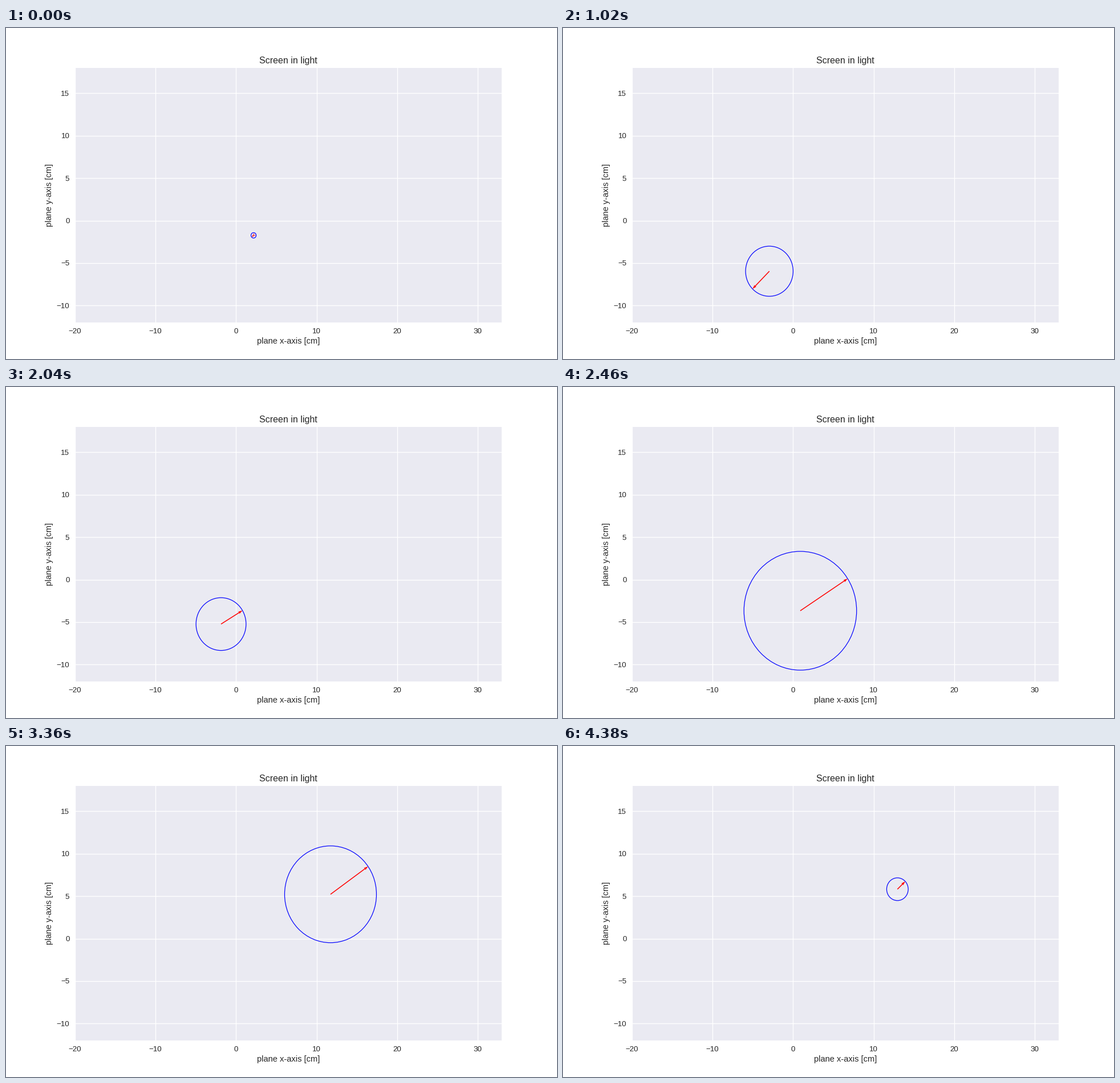
Animation, 966 px wide and 580 px high, one loop 6.16 s. Source, as a matplotlib script:

```python
import numpy as np
import matplotlib.pyplot as plt
from matplotlib.animation import FuncAnimation
from matplotlib.patches import Circle

INTERVAL = 20           # ms per frame
FRAMES = 308            # one loop of 6160 ms
FRAMES_PER_STEP = 3     # the spot moves every 60 ms
STEPS_PER_SECOND = 10   # time scale of the plotted motion

# Key poses: step, position [cm] and velocity [cm/s] as x + yj.
POSES = [
    (0, 2.18 - 1.73j, -0.24 - 0.21j),
    (5, 1.70 - 2.07j, -4.2 - 3.6j),
    (11, -0.86 - 4.16j, -4.89 - 3.74j),
    (22, -3.45 - 6.50j, 0),
    (26, -3.13 - 6.24j, 1.43 + 1.04j),
    (34, -1.86 - 5.23j, 2.66 + 1.60j),
    (46, 4.93 - 0.67j, 10.57 + 8.65j),
    (56, 11.73 + 5.22j, 4.66 + 3.28j),
    (60, 13.10 + 6.10j, 4.0 + 3.0j),
    (64, 18.80 + 10.4j, 0),
    (67, 13.60 + 6.30j, -3.0 - 2.4j),
    (73, 12.96 + 5.82j, 0.97 + 0.92j),
]


def motion(step):
    """Position and velocity on the smooth cubic path through the poses."""
    step = min(step, POSES[-1][0])
    (k0, p0, v0), (k1, p1, v1) = next(
        pair for pair in zip(POSES, POSES[1:]) if step <= pair[1][0])
    span = (k1 - k0) / STEPS_PER_SECOND
    t = (step - k0) / (k1 - k0)
    m0, m1, shift = v0 * span, v1 * span, p1 - p0
    bend = 3 * shift - 2 * m0 - m1
    twist = m0 + m1 - 2 * shift
    position = p0 + t * (m0 + t * (bend + t * twist))
    velocity = (m0 + t * (2 * bend + 3 * t * twist)) / span
    return position, velocity


INK = "#262626"
plt.rcParams.update({
    "font.family": "Liberation Sans",
    "text.color": INK,
    "axes.labelcolor": INK,
    "xtick.color": INK,
    "ytick.color": INK,
})

fig, ax = plt.subplots(figsize=(966 / 96, 580 / 96), dpi=96, facecolor="white")
fig.subplots_adjust(left=0.125, right=0.9, bottom=0.11, top=0.88)
ax.set_facecolor("#EAEAF2")
ax.set_axisbelow(True)
ax.grid(color="white", linewidth=1, linestyle="-")
ax.tick_params(length=0, pad=7, labelsize=10)
for spine in ax.spines.values():
    spine.set_visible(False)
ax.set_title("Screen in light", fontsize=12, pad=6)
ax.set_xlabel("plane x-axis [cm]", fontsize=11, labelpad=3.5)
ax.set_ylabel("plane y-axis [cm]", fontsize=11, labelpad=4)

ring = ax.add_patch(Circle((0, 0), 1, fill=False, edgecolor="blue",
                           linewidth=0.9))
# The small minshaft keeps the arrow head at full size on short arrows.
arrow = ax.quiver([0], [0], [1], [1], color="red", angles="xy",
                  scale_units="xy", scale=1, width=0.002, minshaft=0.1,
                  zorder=3)
ax.set_xlim(-20, 33)
ax.set_ylim(-12, 18)
ax.set_xticks(range(-20, 31, 10))
ax.set_yticks(range(-10, 16, 5))


def update(frame):
    position, velocity = motion(frame // FRAMES_PER_STEP)
    center = position.real, position.imag
    ring.center = center
    ring.radius = abs(velocity)
    arrow.set_offsets([center])
    arrow.set_UVC([velocity.real], [velocity.imag])
    return ring, arrow


anim = FuncAnimation(fig, update, frames=FRAMES, interval=INTERVAL,
                     repeat=True, repeat_delay=0)
plt.show()
```
